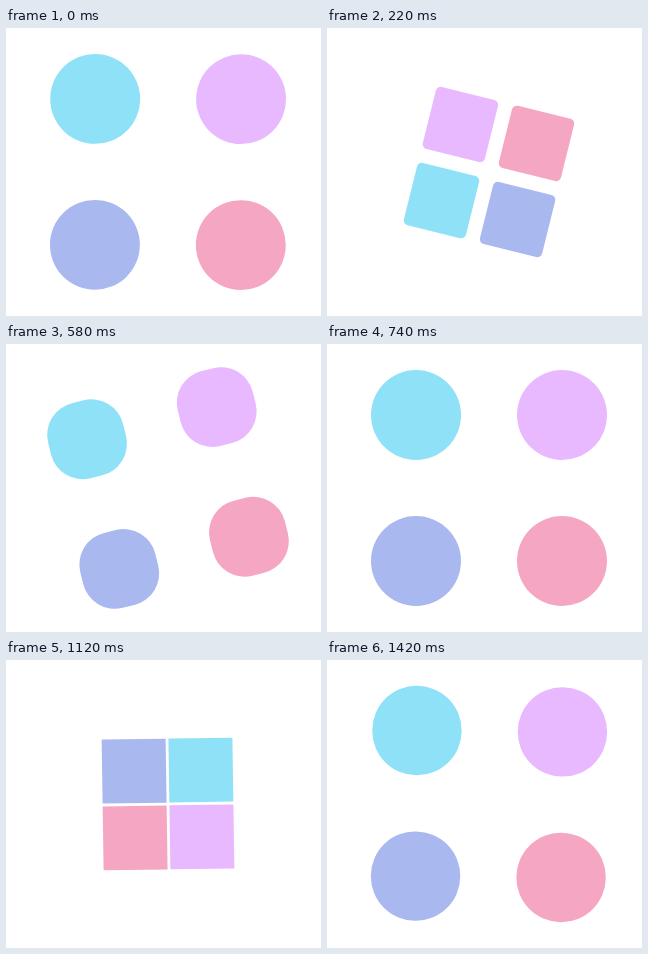
Animation, 315 px wide and 288 px high, one loop 1.44 s. Source, as an HTML page:

```html
<!DOCTYPE html>
<html lang="en">
<head>
<meta charset="utf-8">
<title>Spinning shapes</title>
<style>
  html, body { margin: 0; width: 100%; height: 100%; overflow: hidden; background: #fff; }
  svg { display: block; width: 315px; height: 288px; }
</style>
</head>
<body>
<svg viewBox="0 0 315 288">
  <g id="spin">
    <rect fill="#8ee1f7" data-x="-1" data-y="-1"/>
    <rect fill="#e9b9ff" data-x="1" data-y="-1"/>
    <rect fill="#a9b9f0" data-x="-1" data-y="1"/>
    <rect fill="#f5a6c3" data-x="1" data-y="1"/>
  </g>
</svg>
<script>
  const LOOP = 1440, SWING = 720, HALF = 360, DELAY = 17, STEP = 20;
  const spin = document.getElementById('spin');
  const tiles = [...spin.children];
  const mix = (a, b, p) => a + (b - a) * p;

  // cubic-bezier(.4, 0, .2, 1)
  function ease(x) {
    let lo = 0, hi = 1;
    for (let i = 0; i < 24; i++) {
      const u = (lo + hi) / 2, v = 1 - u;
      if (1.2 * v * v * u + 0.6 * v * u * u + u * u * u < x) lo = u;
      else hi = u;
    }
    return lo * lo * (3 - 2 * lo);
  }

  function draw(time) {
    const t = (time - DELAY + LOOP) % LOOP;
    const phase = t % SWING;
    const e = ease((phase % HALF) / HALF);
    const p = phase < HALF ? e : 1 - e;      // 0 = spread circles, 1 = packed squares
    const dir = t < SWING ? -1 : 1;
    const offset = mix(73, 33, p);
    const size = 64 + 26 * (1 - p) ** 4;     // shrinks early, then settles
    const radius = size * mix(0.5, 0, p);

    spin.setAttribute('transform', `translate(162 144) rotate(${dir * 90 * p})`);
    for (const tile of tiles) {
      tile.setAttribute('x', tile.dataset.x * offset - size / 2);
      tile.setAttribute('y', tile.dataset.y * offset - size / 2);
      tile.setAttribute('width', size);
      tile.setAttribute('height', size);
      tile.setAttribute('rx', radius);
    }
  }

  const start = performance.now();
  function tick() {
    const t = (performance.now() - start) % LOOP;
    draw(Math.floor(t / STEP) * STEP);
    requestAnimationFrame(tick);
  }
  draw(0);
  requestAnimationFrame(tick);
</script>
</body>
</html>
```
